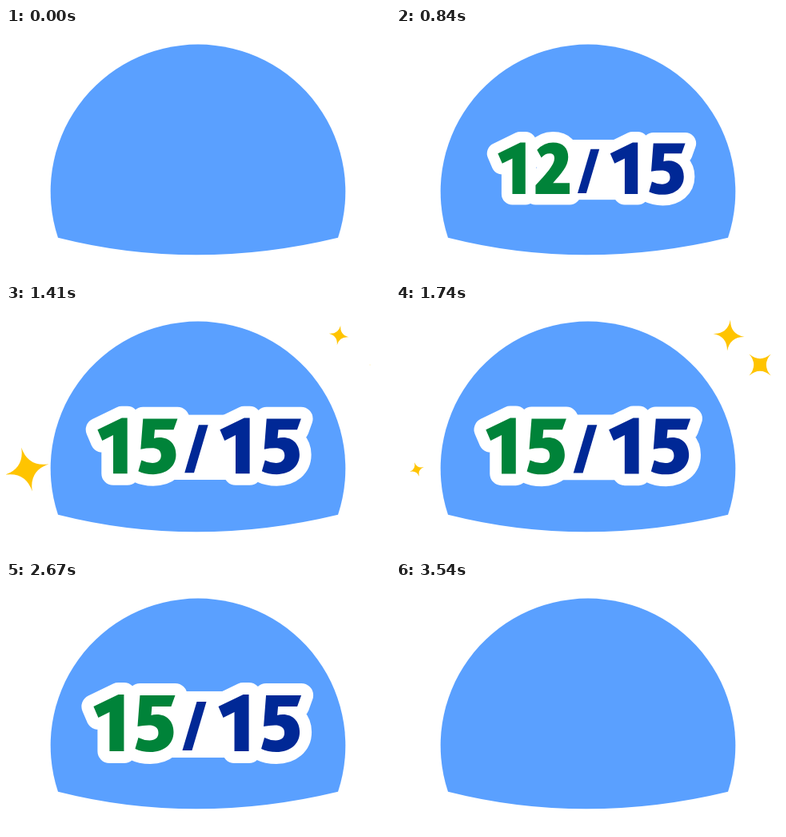
Animation of 480 by 312 pixels, one loop 3.78 s. Source, as an HTML page with a canvas:

```html
<!DOCTYPE html>
<html lang="en">
<head>
<meta charset="utf-8">
<title>Counter</title>
<style>
html, body { margin: 0; width: 100%; height: 100%; overflow: hidden; background: #fff; }
canvas { display: block; }
</style>
</head>
<body>
<canvas id="stage" width="480" height="312"></canvas>
<script>
const ctx = document.getElementById('stage').getContext('2d');
const LOOP = 3780, STEP = 30, GAP = 14, TOTAL = 15;
const BLUE = '#5aa0ff', GREEN = '#008339', NAVY = '#002896', GOLD = '#ffc400';

const dome = new Path2D('M65 262.7A184.3 184.3 0 1 1 415 262.7Q236 306 65 262.7Z');

// Digit outlines, about 70 units tall: [width, path]
const digits = [
  [60, 'M30-1C49-1 60 13 60 35.5S49 72 30 72S0 58 0 35.5S11-1 30-1ZM30 14C21 14 18 22 18 35.5S21 57 30 57S42 49 42 35.5S39 14 30 14Z'],
  [38, 'M0 14L31-1H38V70H20V21L6 28Z'],
  [47, 'M2 9Q12-1 24-1C38-1 45 7 45 19C45 32 35 42 24 55H47V70H0V58C14 43 26 30 26 21C26 16 24 14 19 14Q13 14 8 20Z'],
  [46, 'M4 3Q12-1 22-1C36-1 44 6 44 17Q44 29 33 33Q46 36 46 50C46 63 36 71 19 71Q8 71 0 67L3 52Q11 56 18 56Q28 56 28 48.5Q28 41 17 41H10V27H17Q26 27 26 20Q26 14 18 14Q13 14 7 18Z'],
  [51, 'M26 0H43V42H51V56H43V70H26V56H0V44ZM26 42V22L13 42Z'],
  [49, 'M6 0H50L45 14H21L20 25Q23 24 27 24C40 24 48 33 48 46C48 61 36 71 19 71C12 71 5 69.5 0 67L4 53Q11 56.5 18 56.5C25 56.5 29 53 29 47C29 40 24 37.5 17 37.5Q10 37.5 3 39Z'],
  [49, 'M42 0V15Q24 15 20 29Q24 26 30 26C42 26 49 34 49 47C49 62 39 71 25 71C9 71 0 60 0 42C0 16 14 0 42 0ZM25 40Q19 40 18.5 45Q18.5 57 25 57Q31 57 31 48Q31 40 25 40Z'],
  [53, 'M2 0H53V11L29 70H8L31 15H0Z'],
  [49, 'M13 34Q3 29 3 17C3 6 11-1 25-1C38-1 46 6 46 17Q46 29 36 34Q49 39 49 52C49 64 39 71 25 71C10 71 0 64 0 52Q0 39 13 34ZM24.5 13a6 7 0 1 0 .1 0ZM24.5 41a7.5 8 0 1 0 .1 0Z'],
  [49, 'M7 70V55Q25 55 29 41Q25 44 19 44C7 44 0 36 0 23C0 8 10-1 24-1C40-1 49 10 49 28C49 54 35 70 7 70ZM24 30Q30 30 30.5 25Q30.5 13 24 13Q18 13 18 22Q18 30 24 30Z']
].map(([width, d]) => ({ width, path: new Path2D(d) }));
const slash = new Path2D('M18 8H30L12 69H0Z');

const stars = [
  { x: 26, y: 206, size: 29, start: 900, turn: -56 },
  { x: 416, y: 38, size: 24, start: 1150, turn: 33 },
  { x: 455, y: 75, size: 28, start: 1400, turn: 47 }
];
const drift = [[330, 245.5], [1740, 239.5], [2670, 238.5], [LOOP, 238.5]];

const clamp = v => Math.max(0, Math.min(1, v));

function lerpKeys(keys, t) {
  if (t <= keys[0][0]) return keys[0][1];
  const i = keys.findIndex(k => t < k[0]);
  const [t0, a] = keys[i - 1], [t1, b] = keys[i];
  return a + (b - a) * (t - t0) / (t1 - t0);
}

function drawDome(alpha) {
  ctx.globalAlpha = alpha;
  ctx.fillStyle = BLUE;
  ctx.fill(dome);
  ctx.globalAlpha = 1;
}

// Coordinates are relative to the middle of the label
function layout(count) {
  const tens = digits[Math.floor(count / 10)], ones = digits[count % 10];
  const left = -78.5 - (tens.width + GAP + ones.width) / 2;
  return [
    [tens.path, left, GREEN],
    [ones.path, left + tens.width + GAP, GREEN],
    [digits[1].path, 27, NAVY],
    [digits[5].path, 80.5, NAVY]
  ];
}

function drawLabel(t) {
  const u = clamp((t - 310) / 620);
  const scale = (1 - (1 - u) ** 1.38) * (0.974 + Math.max(0, t - 1000) * 1.6e-5);
  const glyphs = layout(Math.floor(TOTAL * u));
  const place = (x, paint) => {
    ctx.save();
    ctx.translate(x, -35);
    paint();
    ctx.restore();
  };
  const fillGlyph = ([path, x, color]) => place(x, () => {
    ctx.fillStyle = color;
    ctx.fill(path, 'evenodd');
  });
  ctx.save();
  ctx.translate(lerpKeys(drift, t), 168.5 + 8.5 * scale);
  ctx.scale(scale, scale);
  ctx.lineWidth = 30;
  ctx.lineJoin = 'round';
  ctx.strokeStyle = ctx.fillStyle = '#fff';
  ctx.fillRect(-36, -40, 76, 83); // backing of the slash
  glyphs.forEach(([path, x]) => place(x, () => ctx.stroke(path)));
  [...glyphs, [slash, -18, NAVY]].forEach(fillGlyph);
  ctx.restore();
}

function drawStar({ x, y, size, start, turn }, t) {
  const age = (t - start) / 1000;
  if (age <= 0 || age >= 1) return;
  const r = size * (1 - Math.abs(2 * age - 1)), c = r * 0.08;
  ctx.save();
  ctx.translate(x, y);
  ctx.rotate((turn + 259 * age) * Math.PI / 180);
  ctx.beginPath();
  ctx.moveTo(r, 0);
  ctx.quadraticCurveTo(c, c, 0, r);
  ctx.quadraticCurveTo(-c, c, -r, 0);
  ctx.quadraticCurveTo(-c, -c, 0, -r);
  ctx.quadraticCurveTo(c, -c, r, 0);
  ctx.fillStyle = GOLD;
  ctx.fill();
  ctx.restore();
}

function draw(t) {
  ctx.fillStyle = '#fff';
  ctx.fillRect(0, 0, 480, 312);
  drawDome(1);
  if (t >= 330 && t < 3540) {
    drawLabel(t);
    // The label fades away under the dome colour
    drawDome(clamp((t - 3360) / 180));
  }
  stars.forEach(star => drawStar(star, t));
}

const begin = performance.now();
function tick() {
  const t = (performance.now() - begin) % LOOP;
  draw(Math.floor(t / STEP) * STEP);
  requestAnimationFrame(tick);
}
tick();
</script>
</body>
</html>
```
